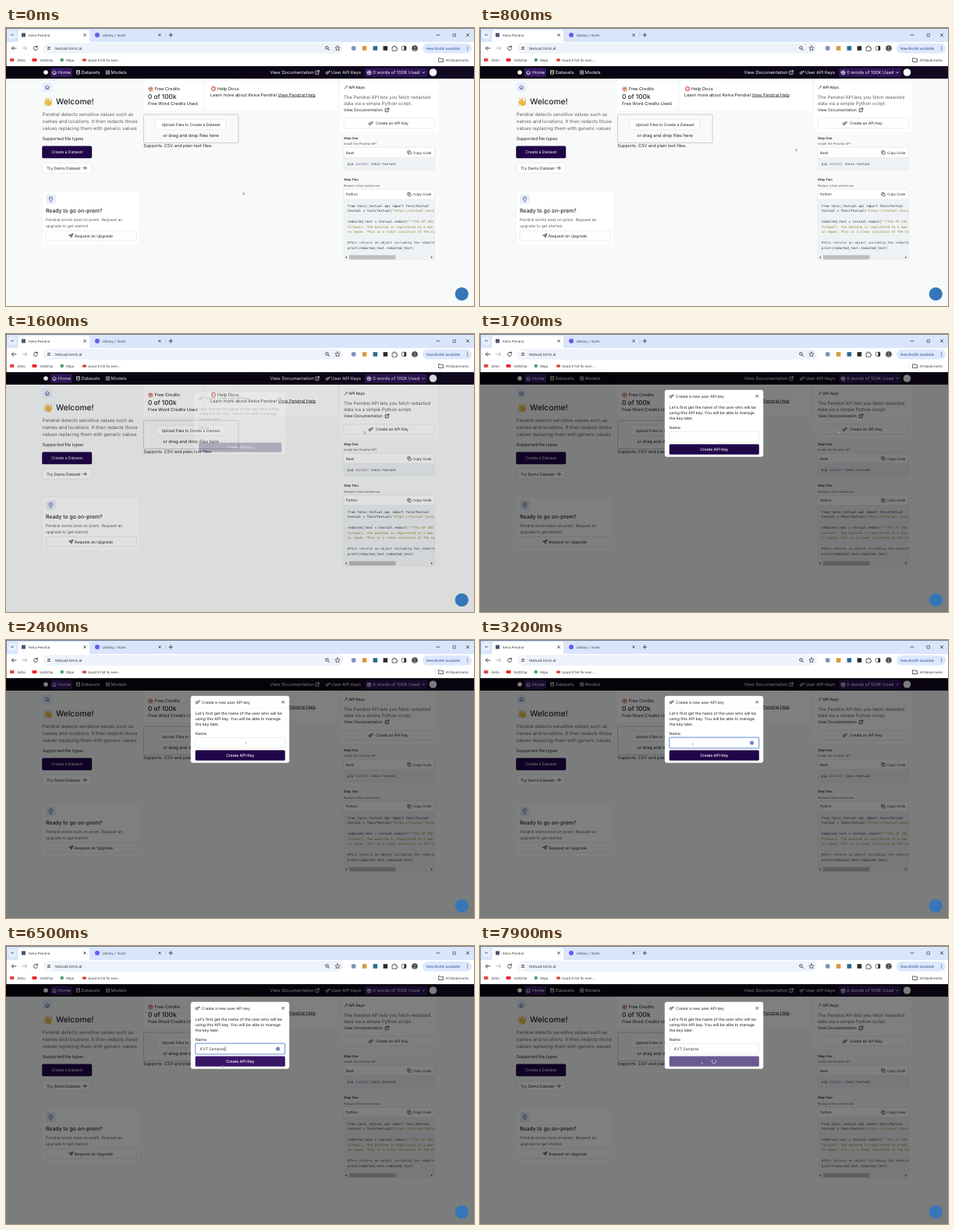
An HTML page that plays this animation: 600x357 px, repeating every 8000 ms.

```html
<!DOCTYPE html>
<html lang="en">
<head>
<meta charset="utf-8">
<title>API key walkthrough</title>
<style>
html, body { margin: 0; width: 100%; height: 100%; overflow: hidden; background: #f8fafa; }
svg { display: block; width: 600px; height: 357px; }
text { font-family: Inter, "Liberation Sans", sans-serif; text-rendering: geometricPrecision; white-space: pre; }
.ui { font-family: "Open Sans", "Noto Sans", sans-serif; }
.mono { font-family: "DejaVu Sans Mono", "Liberation Mono", monospace; }
</style>
</head>
<body>
<svg id="stage" viewBox="0 0 600 357" xmlns="http://www.w3.org/2000/svg"></svg>
<script>
const LOOP = 8000;
const INK = '#222226', BRAND = '#21074a', EDGE = '#dddfe2', SOFT = '#5c5f66';

// drawing helpers, each returns markup
const rect = (x, y, w, h, r, fill, stroke = 'none', more = '') =>
  `<rect x="${x}" y="${y}" width="${w}" height="${h}" rx="${r}" fill="${fill}" stroke="${stroke}" stroke-width=".6" ${more}/>`;
const dot = (x, y, r, fill, stroke = 'none', sw = .6) =>
  `<circle cx="${x}" cy="${y}" r="${r}" fill="${fill}" stroke="${stroke}" stroke-width="${sw}"/>`;
const line = (d, stroke = INK, w = .7, more = '') =>
  `<path d="${d}" fill="none" stroke="${stroke}" stroke-width="${w}" stroke-linecap="round" stroke-linejoin="round" ${more}/>`;
const fill = (d, color) => `<path d="${d}" fill="${color}"/>`;
const text = (x, y, size, str, color = INK, more = '') =>
  `<text x="${x}" y="${y}" font-size="${size}" fill="${color}" ${more}>${str}</text>`;
const ui = (x, y, size, str, color = '#2b2d31') => text(x, y, size, str, color, 'class="ui"');
const MID = 'text-anchor="middle"', SEMI = 'font-weight="600"', MEDIUM = 'font-weight="500"';

// icons
const cross = (x, y, r, c = INK, w = .7) =>
  line(`M${x - r} ${y - r}l${2 * r} ${2 * r}m0 ${-2 * r}l${-2 * r} ${2 * r}`, c, w);
const keyIcon = (x, y, c = INK) =>
  dot(x - 1.3, y + .8, 1.4, 'none', c, .8) + line(`M${x - .2} ${y - .1}l2.4 -1.9m-.9 .7l.9 1.1`, c, .8);
const houseIcon = (x, y, c) =>
  line(`M${x - 2.5} ${y}l2.5 -2.4l2.5 2.4M${x - 1.8} ${y - .5}v2.9h3.6v-2.9M${x} ${y + 2.4}v-1.5`, c);
const linkIcon = (x, y, c = INK) =>
  line(`M${x - .3} ${y - 1.7}h-1.9v4h4v-1.9M${x + .4} ${y - 2.3}h2v2m0 -2l-2.6 2.6`, c);
const copyIcon = (x, y) =>
  rect(x - 2.2, y - 2.2, 3.2, 3.2, .5, 'none', INK) + rect(x - .9, y - .9, 3.2, 3.2, .5, '#fff', INK);
const giftIcon = (x, y, c) =>
  line(`M${x - 2.5} ${y - 1}h5v1.3h-5zM${x - 2} ${y + .3}v2.4h4v-2.4M${x} ${y - 1}v3.7M${x} ${y - 1}l-1.5 -1.6M${x} ${y - 1}l1.5 -1.6`, c);

function browser() {
  return rect(0, 0, 600, 19, 0, '#d9e5fb')
    + rect(3, 3.5, 10, 10.5, 3, '#e8f0fd') + line('M6.4 8l1.7 1.7l1.7 -1.7', INK, .8)
    + fill('M13 18.5q2.5 0 2.5 -2.5V5.5q0 -3 3 -3H104q3 0 3 3V16q0 2.5 2.5 2.5z', '#fff')
    + rect(20, 6.5, 5, 5, 0, '#4a566c') + ui(29, 10.6, 4.3, 'Kelva Pendral') + cross(101, 9, 1.4)
    + dot(117, 9, 3, '#625df5') + ui(123.5, 10.6, 4.4, 'Library | Vurm') + cross(197, 9, 1.4)
    + line('M204.8 6v6', '#a9bad8', .5) + line('M209 9h4.4m-2.2 -2.2v4.4', INK, .8)
    + line('M552 9h4') + rect(573, 7.5, 3.4, 3.4, .4, 'none', INK) + cross(592, 9, 1.7)
    + rect(0, 18, 600, 31, 0, '#fff')
    + line('M13 26H7.5m2.2 -2.3L7.4 26l2.3 2.3', INK, .8)
    + line('M21 26h5.5m-2.2 -2.3l2.3 2.3l-2.3 2.3', '#a5a8ad', .8)
    + line('M39.9 24.3a2.5 2.5 0 1 0 .6 2.2M40.4 23v1.7h-1.7', INK, .8)
    + rect(48, 19.3, 384, 13.4, 6.7, '#edf2fb') + dot(55, 26, 4.6, '#fff')
    + line('M53 24.8h1.6m1.4 0h1M53 27.2h.6m1.6 0h2') + dot(55.3, 24.8, .6, 'none', INK) + dot(54.3, 27.2, .6, 'none', INK)
    + ui(63, 28, 5.05, 'textual.tonic.ai')
    + dot(411.4, 25.4, 1.8, 'none', INK, .8) + line('M412.8 26.8l1.8 1.8', INK, .8)
    + line('M425 22.8l.9 2.1l2.3 .2l-1.8 1.5l.6 2.2l-2 -1.2l-2 1.2l.6 -2.2l-1.8 -1.5l2.3 -.2z', INK, .6)
    + dot(445.7, 26, 3, '#7d95bd') + rect(456.8, 23.2, 5.6, 5.6, 0, '#d9983f')
    + rect(470.6, 23.2, 5.6, 5.6, 0, '#286a91') + rect(483.6, 23.2, 5.6, 5.6, 0, '#292a2d')
    + line('M495.5 24.4h1.7a1 1 0 1 1 1.8 0h1.6v1.7a1 1 0 1 1 0 1.7v1.4h-5.1z')
    + rect(507.5, 23.4, 5.4, 5.2, .8, 'none', INK) + rect(510.4, 23.4, 2.5, 5.2, .4, INK)
    + dot(524, 26, 3.8, '#4c4a4b') + dot(524, 25, 1.2, '#8d8582') + fill('M521.8 28.6q2.2 -3 4.4 0q-2.2 1.6 -4.4 0z', '#8d8582')
    + rect(534, 19.8, 63, 12.8, 6.4, '#dce8fd') + ui(539, 27.8, 4.55, 'New Brofel available', '#1b3f82')
    + [24, 26, 28].map(y => dot(591.7, y, .55, INK)).join('')
    + rect(5, 38.9, 5.4, 4.2, .4, '#db4e42') + rect(33.5, 38.9, 6, 4.2, 1, '#ed2929')
    + dot(71.7, 41, 2.3, '#4ba568') + rect(98, 39.4, 5, 3.4, .8, '#d9413c')
    + ui(14.5, 42.6, 4.4, 'Zelto') + ui(43.5, 42.6, 4.4, 'VidOrba') + ui(77, 42.6, 4.4, 'Mipo')
    + ui(105, 42.6, 4.4, 'Good $150 fix ever...')
    + line('M550 38v6', '#c9d3e5', .5) + line('M555 38.8h2l.8 .9h2.8v3.8h-5.6z')
    + ui(563.8, 42.6, 4.4, 'All Bookmarks')
    + rect(0, 0, 600, .8, 0, '#5a5f68') + rect(0, 0, .7, 49, 0, '#5a5f68');
}

function header() {
  const w = '#f4f2f8';
  return rect(0, 49, 600, 16, 0, 'url(#night)') + dot(51, 57, 2.8, '#fff')
    + rect(57, 51.2, 28, 11.6, 2, '#351661') + houseIcon(62, 57, w) + text(67, 59.1, 5.7, 'Home', w)
    + line('M90.5 55v4q2 1.5 4 0v-4q-2 -1.4 -4 0q2 1.4 4 0M90.5 57q2 1.4 4 0', w) + text(96.5, 59.1, 5.8, 'Datasets', w)
    + [[128.3, 54.7], [131, 54.7], [128.3, 57.4], [131, 57.4]].map(([x, y]) => rect(x, y, 1.9, 1.9, .3, 'none', w)).join('')
    + text(134.5, 59.1, 5.8, 'Models', w)
    + text(338.5, 59.1, 5.76, 'View Documentation', w) + linkIcon(399, 57, w)
    + keyIcon(413, 57, w) + text(417, 59.1, 5.7, 'User API Keys', w)
    + rect(460, 51.2, 80, 11.6, 2, '#2e1356') + giftIcon(465.6, 57, w)
    + text(470.3, 59.1, 5.75, '0 words of 100K Used', w) + line('M533.5 56.4l1.6 1.5l1.6 -1.5', w)
    + dot(547.5, 57, 4.8, '#f5f7fb');
}

function leftColumn() {
  const box = '#e7eefb', blue = '#38508a';
  return rect(47, 70, 12, 12, 2, box) + houseIcon(53, 76, blue)
    + fill('M50 93l2.6 2.1l-2.7 -4.2q.8 -1.3 1.7 0l3 3.2l-2 -4q1 -1 1.8 .2l2.3 4.2l.6 -2q1.5 -.7 1.3 1.2q1 4.2 -1.3 5.8q-3 1.8 -5.4 -.8l-3 -3.5q-.2 -1.5 1.1 -1.2z', '#e9b948')
    + line('M48.6 97.2q.4 1.8 2.3 2.4M56.8 89.7q1.7 .6 2 2.2', '#9a958d', .6)
    + text(64, 98.2, 10.25, 'Welcome!', INK, MEDIUM)
    + ['Pendral detects sensitive values such as', 'names and locations. It then redacts those', 'values replacing them with generic values']
      .map((s, i) => text(46.8, 113.1 + i * 8.7, 6.1, s, SOFT)).join('')
    + text(46.5, 144.4, 5.5, 'Supported file types')
    + rect(46.2, 151.6, 64, 15.6, 1.8, BRAND) + text(78.2, 161.3, 5.05, 'Create a Dataset', '#fff', MID)
    + rect(46.5, 173.3, 63.5, 13, 1.6, '#fff', EDGE) + text(52.3, 181.7, 5.08, 'Try Demo Dataset')
    + line('M98.5 179.8h4.6m-2 -2l2 2l-2 2')
    + rect(46.5, 209.5, 125, 68.5, 2, '#fff', '#eff1f3')
    + rect(51.2, 213.5, 12.5, 12.5, 2, box)
    + line('M57.4 223q-2.3 -2.2 -2.3 -4a2.3 2.3 0 0 1 4.6 0q0 1.8 -2.3 4z', blue) + dot(57.4, 219, .7, blue)
    + text(51, 237.3, 6.85, 'Ready to go on-prem?', INK, MEDIUM)
    + text(51, 248.3, 5.1, 'Pendral works best on-prem. Request an', SOFT) + text(51, 255.5, 5.1, 'upgrade to get started.', SOFT)
    + rect(51, 260.3, 116.5, 12.7, 1.6, '#fff', EDGE)
    + line('M81 266.3l4.8 -2.1l-1.8 4.9l-1 -2zM83 267.1l2.8 -2.9')
    + text(88, 268.5, 5.07, 'Request an Upgrade');
}

function middleColumn() {
  return rect(176.5, 65, 76.5, 41, 1.5, '#fff') + giftIcon(185.5, 78, '#c0592f') + text(190.6, 80.4, 5.65, 'Free Credits')
    + text(182, 91, 8.25, '0 of 100k', INK, MEDIUM) + text(182, 99.3, 5.65, 'Free Word Credits Used')
    + rect(256, 65, 169, 40.5, 1.5, '#fff')
    + dot(266, 78, 2.3, '#fff', '#d6553f', 1.2) + line('M263.8 75.8l.9 .9m3.5 0l.9 -.9m0 4.4l-.9 -.9m-3.5 0l-.9 .9', '#eec9c2', .8)
    + text(271, 80.3, 5.7, 'Help Docs')
    + text(262, 87.5, 5.62, 'Learn more about Kelva Pendral <tspan text-decoration="underline">View Pendral Help</tspan>')
    + rect(176.5, 111, 121.5, 36.5, 1, '#f8f9f9', '#aeb1b4')
    + rect(192, 117.3, 89.5, 13, 1.6, '#fff', EDGE) + text(237, 125.6, 4.95, 'Upload Files to Create a Dataset', INK, MID)
    + text(237, 140, 5.7, 'or drag and drop files here', INK, MID)
    + text(176.3, 153.4, 5.52, 'Supports .CSV and plain text files.');
}

function codeHead(y, lang, bodyH) {
  return rect(433, y, 116.5, 13 + bodyH, 1.5, '#eff2f5', '#e3e6ea') + rect(433, y, 116.5, 13, 1.5, '#fff', '#e3e6ea')
    + text(436, y + 8.2, 4.45, lang) + copyIcon(517, y + 6.6) + text(522, y + 8.2, 4.4, 'Copy Code');
}

function rightColumn() {
  const olive = '#8b8428';
  const span = (s, c) => `<tspan fill="${c}">${s}</tspan>`;
  const code = [
    'from tonic_textual.api import TonicTextual',
    'textual = TonicTextual(' + span('"https://textual.tonic.ai"', olive), '',
    'redacted_text = textual.redact(' + span('"""The IP 192.168', olive),
    span('firewall. The machine is registered to a man', olive),
    span('in Japan. This is a clear violation of The Co', olive), '',
    span('#This returns an object including the redacted', '#4c5057'),
    'print(redacted_text.redacted_text)'
  ];
  return rect(428.5, 65, 125, 68, 1.5, '#fff')
    + line('M434 78l3 -3', '#c8a13e', 1.1) + line('M436.5 74.5l1 1', '#8a8d91', 1.2)
    + text(439.5, 78.2, 4.85, 'API Keys', INK, MEDIUM)
    + text(433, 90.6, 5.95, 'The Pendral API lets you fetch redacted', SOFT) + text(433, 99, 5.95, 'data via a simple Python script.', SOFT)
    + text(433, 107.4, 5.08, 'View Documentation') + linkIcon(488.4, 105.3)
    + rect(433, 115.8, 116.5, 13, 1.6, '#fff', EDGE, 'id="keyButton"')
    + keyIcon(468, 122.3) + text(474, 124.2, 4.92, 'Create an API Key')
    + text(433, 142.5, 4.18, 'Step One', INK, SEMI) + text(433, 149.8, 4.08, 'Install the Pendral API', SOFT)
    + codeHead(153.3, 'Bash', 16)
    + text(437.8, 176, 4.18, 'pip ' + span('install', '#6b4c93') + ' tonic-textual', '#2c3036', 'class="mono"')
    + text(433, 196, 4.18, 'Step Two', INK, SEMI) + text(433, 203.8, 4.12, 'Redact a few sentences', SOFT)
    + codeHead(207, 'Python', 78)
    + '<g clip-path="url(#codeClip)">'
    + code.map((s, i) => text(437.8, 229.6 + i * 6.76, 4.15, s, '#2c3036', 'class="mono"')).join('') + '</g>'
    + rect(433.3, 291, 116, 6.8, 0, '#f0f1f1') + rect(440, 291.7, 59.5, 5.4, 0, '#bcbdbe')
    + fill('M435 294.4l2 -1.5v3zM547 294.4l-2 -1.5v3z', '#55585c');
}

function dialog() {
  return rect(236.8, 71.7, 126.4, 86, 3, '#fff')
    + keyIcon(246, 79.7) + text(251, 81.6, 4.98, 'Create a new user API key') + cross(355.2, 79.8, 1.5)
    + line('M237 87.8H363', '#eceef0', .5)
    + ["Let's first get the name of the user who will be", 'using this API key. You will be able to manage', 'the key later.']
      .map((s, i) => text(242.8, 96.3 + i * 7, 5.08, s)).join('')
    + text(242.8, 122.3, 5.1, 'Name')
    + rect(241.9, 124.2, 116.7, 15.6, 2.2, '#c5d8f8', 'none', 'id="glow"')
    + rect(243, 125.2, 114.5, 13.6, 1.5, '#fff', EDGE, 'id="field"')
    + text(248.8, 133.8, 5.05, '', '#44474d', 'id="typed"')
    + line('M0 129.5v5.3', INK, .6, 'id="caret"')
    + '<g id="fieldMark">' + dot(348.5, 132, 2.6, '#6f88cf') + '</g>'
    + rect(242.7, 141.5, 115.1, 13.3, 1.6, BRAND, 'none', 'id="submit"')
    + text(300.2, 150, 5.05, 'Create API Key', '#fff', MID + ' ' + MEDIUM + ' id="submitText"')
    + '<g id="spinner">' + line('M0 -2.7A2.7 2.7 0 1 1 -2.7 0', '#d9cfe4', .8) + '</g>';
}

const stage = document.getElementById('stage');
stage.innerHTML = `<defs>
  <linearGradient id="night"><stop offset="0" stop-color="#080510"/><stop offset=".5" stop-color="#0b0514"/><stop offset="1" stop-color="#130923"/></linearGradient>
  <clipPath id="codeClip"><rect x="433" y="220" width="116.5" height="72"/></clipPath></defs>`
  + rect(0, 0, 600, 357, 0, '#f8fafa')
  + leftColumn() + middleColumn() + rightColumn() + header() + browser()
  + rect(0, 49, 600, 308, 0, '#000', 'none', 'id="mask"')
  + '<g id="dialog">' + dialog() + '</g>' + dot(584.3, 341.5, 8.6, '#3576b9')
  + '<g id="cursor"><path id="arrow" d="M0 -1.2v2.8l.7 -.5l.6 1l.5 -.3l-.5 -1h.9z" fill="#eee" stroke="#444" stroke-width=".3"/>'
  + line('M0 -.4v2', '#555', .5, 'id="beam"') + '</g>';

const el = id => document.getElementById(id);
const show = (id, on) => el(id).setAttribute('visibility', on ? 'inherit' : 'hidden');
const set = (id, name, value) => el(id).setAttribute(name, value);
const ramp = (t, a, b) => {
  const p = Math.min(1, Math.max(0, (t - a) / (b - a)));
  return p * p * (3 - 2 * p);
};

const NAME = 'KVT Samples';
const KEYS = [3600, 3700, 3800, 4000, 4150, 4500, 4700, 4850, 4960, 5100, 5300];
const OPEN = 1560, FOCUS = 2700, SEND = 7760;
const START = [304, 212];
const MOVES = [[50, 1300, 459, 126], [1750, 2650, 273, 133], [5750, 6500, 277, 154.5], [6600, 6900, 281, 152], [7150, 7500, 284, 150]];

function cursorAt(t) {
  let [x, y] = START;
  for (const [a, b, nx, ny] of MOVES) {
    const p = ramp(t, a, b);
    x += (nx - x) * p;
    y += (ny - y) * p;
  }
  return [x, y];
}
const inside = (x, y, l, top, r, bottom) => x > l && x < r && y > top && y < bottom;

function draw(t) {
  const [x, y] = cursorAt(t);
  const opened = ramp(t, OPEN, OPEN + 130);
  const zoom = .9 + .1 * opened;
  set('mask', 'opacity', .5 * opened);
  set('dialog', 'opacity', opened);
  set('dialog', 'transform', `translate(300 115) scale(${zoom}) translate(-300 -115)`);
  show('dialog', opened > 0);

  const overKey = t < OPEN + 40 && inside(x, y, 433, 115.8, 549.5, 128.8);
  set('keyButton', 'stroke', overKey ? '#33343b' : EDGE);

  const focused = t >= FOCUS && t < SEND;
  show('glow', focused);
  show('fieldMark', focused);
  set('field', 'stroke', focused ? '#3d6fc9' : EDGE);

  const count = KEYS.filter(k => k <= t).length;
  el('typed').textContent = NAME.slice(0, count);
  const lastKey = count ? KEYS[count - 1] : FOCUS;
  show('caret', focused && (t - lastKey) % 1000 < 500);
  set('caret', 'transform', `translate(${249.1 + (count ? el('typed').getComputedTextLength() : 0)} 0)`);

  const loading = t >= SEND;
  const overSubmit = opened === 1 && inside(x, y, 242.7, 141.5, 357.8, 154.8);
  set('submit', 'fill', loading ? '#6a5a91' : overSubmit ? '#3a1667' : BRAND);
  show('submitText', !loading);
  show('spinner', loading);
  set('spinner', 'transform', `translate(300 148.2) rotate(${(t - SEND) * .36})`);

  const overField = opened === 1 && inside(x, y, 243, 125, 357.5, 139);
  show('arrow', !overField);
  show('beam', overField);
  set('cursor', 'transform', `translate(${x} ${y})`);
}

function tick() {
  draw(performance.now() % LOOP);
  requestAnimationFrame(tick);
}
tick();
</script>
</body>
</html>
```
